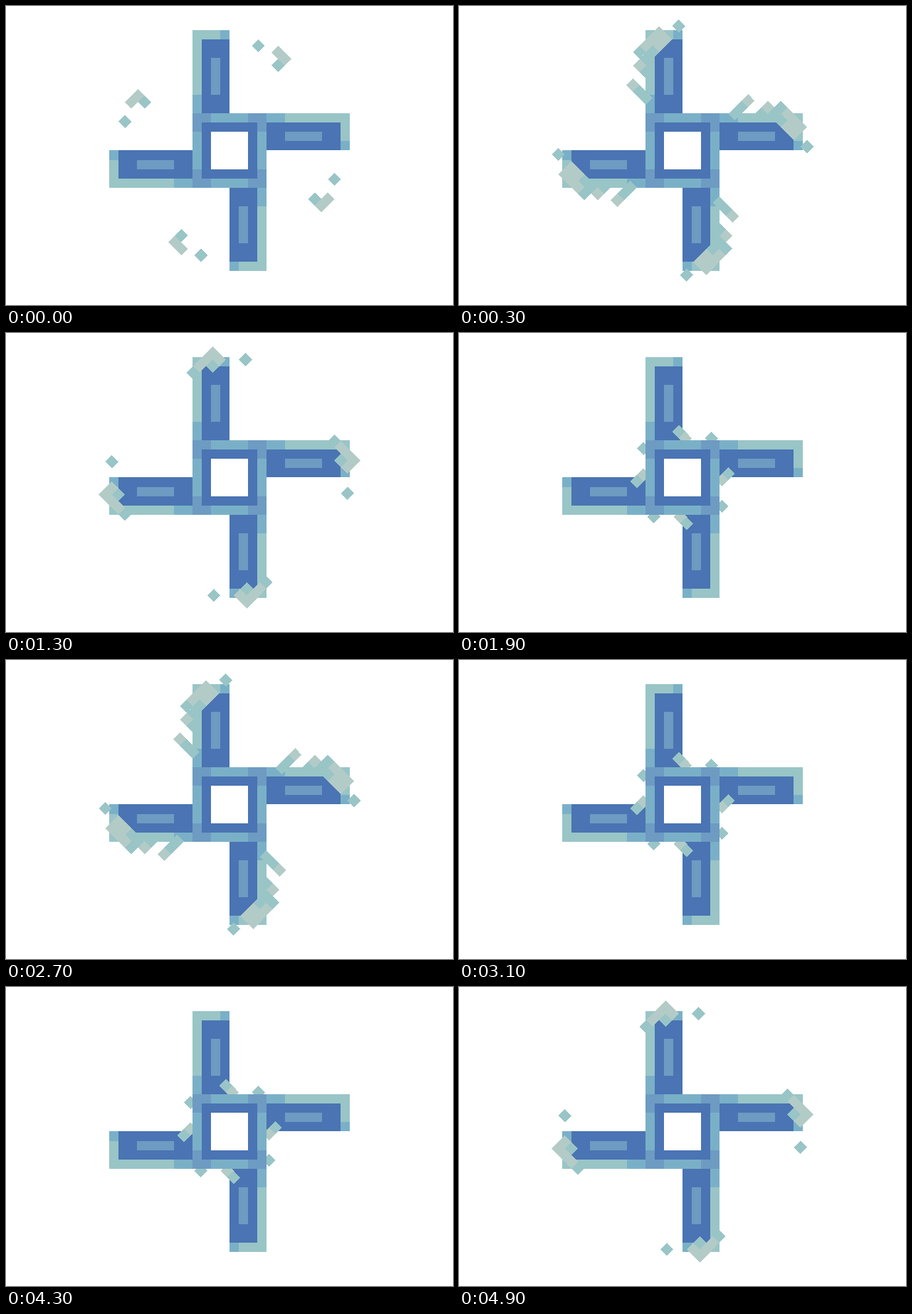
An HTML page for the animation above (5000 ms loop, 628x421 px).

```html
<!DOCTYPE html>
<html lang="en">
<head>
<meta charset="utf-8">
<title>Pinwheel</title>
<style>
  html, body { margin: 0; width: 100%; height: 100%; overflow: hidden; background: #fff; }
  svg { display: block; width: 100%; height: 100%; shape-rendering: crispEdges; }
</style>
</head>
<body>
<svg viewBox="0 0 628 421">
  <g transform="translate(314.3 203.48) scale(1 1.003)">
    <g id="arms"></g>
    <g id="wind"></g>
    <g id="hub"></g>
  </g>
</svg>
<script>
const CELL = 13;
const HALF = CELL / Math.SQRT2;
const LOOP = 5000, STEP = 200, LEAD = 500, AGES = 6;
const DARK = '#4a74b3', MID = '#6d9bc2', TEAL = '#7ab0c7', LIGHT = '#99c5c7', PALE = '#b3cbc7';

const layer = id => document.getElementById(id);

// Rectangle measured in cells from the centre.
const block = (x, y, w, h, fill) =>
  `<rect x="${x * CELL}" y="${y * CELL}" width="${w * CELL}" height="${h * CELL}" fill="${fill}"/>`;

// Tilted cell on the diagonal lattice of the wind.
const diamond = (i, j, fill) => {
  const x = (i + 4.4) * HALF, y = (j - 16) * HALF;
  return `<path d="M${x} ${y - HALF}l${HALF} ${HALF}l${-HALF} ${HALF}l${-HALF} ${-HALF}z" fill="${fill}"/>`;
};

const repeat = (n, make) => Array.from({ length: n }, (_, k) => make(k)).join('');
const fourfold = shape => repeat(4, k => `<g transform="rotate(${k * 90})">${shape}</g>`);

// A speck leaves the hub and falls along a parabola.
function mote(age) {
  if (age === 0) return diamond(0, 10, LIGHT);
  return diamond(1 - age * (age - 1) / 2, (age - 4) * (age - 5) / 2 - 3, LIGHT);
}

// Diagonal row running down to the left, pale at its upper end.
const streak = (i, j, length, pale) =>
  repeat(length, k => diamond(i - k, j + k, k < pale ? PALE : LIGHT));

// Two rows fly outward, then grow and slide down the arm's edge.
function crest(age) {
  const outward = age < 3;
  const i = outward ? 4 * age - 5 : -4 - age;
  const j = outward ? 9 - 4 * age : age - 6;
  const inner = Math.max(1, 2 * Math.floor(age / 2));
  return streak(i, j, outward ? 1 : 4, Math.min(age, 3)) +
         streak(i + 1, j + 1, inner, Math.ceil(inner / 2));
}

// Late in the gust, spines with pale tips stand off the edge.
function spines(age) {
  if (age < 4) return '';
  const spine = n => repeat(n + 1, k =>
    diamond(-6 - age - k, 4 * n + age - 4 - k, k === n ? PALE : LIGHT));
  return spine(1) + spine(2);
}

const arm =
  block(-4, -13, 4, 9, DARK) +
  block(-4, -13, 1, 7, LIGHT) +
  block(-4, -13, 3, 1, LIGHT) +
  block(-1, -13, 1, 1, TEAL) +
  block(-4, -6, 1, 2, TEAL) +
  block(-2, -10, 1, 4, MID);

const corner = block(-4, -4, 2, 1, MID) + block(-4, -4, 1, 2, MID);

layer('arms').innerHTML = fourfold(arm);
layer('hub').innerHTML =
  block(-4, -4, 8, 8, TEAL) + fourfold(corner) +
  block(-3, -3, 6, 6, DARK) + block(-2, -2, 4, 4, '#fff');

let shown = -1;
function draw(time) {
  const age = Math.floor((time % LOOP + LEAD) / STEP) % AGES;
  if (age === shown) return;
  shown = age;
  layer('wind').innerHTML = fourfold(mote(age) + crest(age) + spines(age));
}

const start = performance.now();
function tick() {
  draw(performance.now() - start);
  requestAnimationFrame(tick);
}
tick();
</script>
</body>
</html>
```
